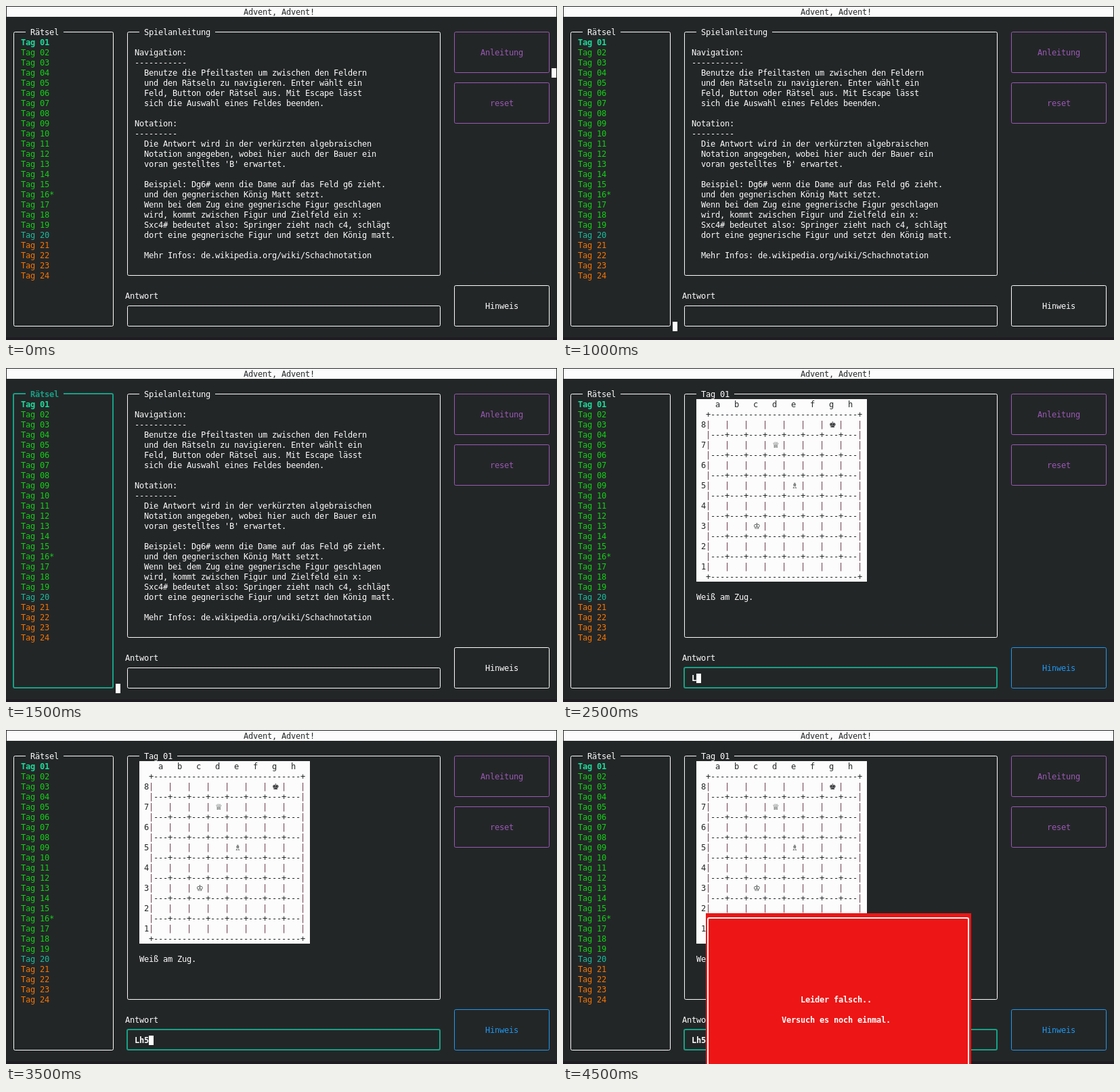
Recreate the animation shown at these times as an HTML page with a canvas. Size 814 by 494 pixels, loop 5000 ms.

```html
<!DOCTYPE html>
<html lang="de">
<head>
<meta charset="utf-8">
<title>Advent, Advent!</title>
<style>
  html, body { margin: 0; width: 100%; height: 100%; overflow: hidden; background: #232627; }
  canvas { display: block; }
</style>
</head>
<body>
<canvas id="screen" width="814" height="494"></canvas>
<script>
const ctx = document.getElementById('screen').getContext('2d', { alpha: false });
const CELL_W = 7, CELL_H = 15, STEP_MS = 500, STEPS = 10;
const INK = '#fcfcfc', BACK = '#232627', GREEN = '#11d116', MINT = '#1cdc9a', CYAN = '#1abc9c',
  FOCUS = '#16a085', ORANGE = '#f67400', PURPLE = '#9b59b6', BLUE = '#1d99f3', RED = '#ed1515',
  PIPE = '#6a3a4a', EDGE = '#1f1c22';
const MONO = '12px "DejaVu Sans Mono", monospace';
const SYMBOLS = '12px "DejaVu Sans", sans-serif';

const HELP = `Navigation:
-----------
  Benutze die Pfeiltasten um zwischen den Feldern
  und den Rätseln zu navigieren. Enter wählt ein
  Feld, Button oder Rätsel aus. Mit Escape lässt
  sich die Auswahl eines Feldes beenden.

Notation:
---------
  Die Antwort wird in der verkürzten algebraischen
  Notation angegeben, wobei hier auch der Bauer ein
  voran gestelltes 'B' erwartet.

  Beispiel: Dg6# wenn die Dame auf das Feld g6 zieht.
  und den gegnerischen König Matt setzt.
  Wenn bei dem Zug eine gegnerische Figur geschlagen
  wird, kommt zwischen Figur und Zielfeld ein x:
  Sxc4# bedeutet also: Springer zieht nach c4, schlägt
  dort eine gegnerische Figur und setzt den König matt.

  Mehr Infos: de.wikipedia.org/wiki/Schachnotation`.split('\n');

const PIECES = { g8: '\u265A', d7: '\u2655', e5: '\u2657', c3: '\u2654' };

const left = col => 1 + col * CELL_W;
const top_ = row => 1 + row * CELL_H;

function fillCells(col, row, cols, rows, color) {
  ctx.fillStyle = color;
  ctx.fillRect(left(col), top_(row), cols * CELL_W, rows * CELL_H);
}

// Terminal text: one glyph per cell.
function print(col, row, text, color = INK, bold = false) {
  ctx.font = (bold ? 'bold ' : '') + MONO;
  ctx.fillStyle = color;
  [...text].forEach((char, i) => {
    if (char !== ' ') ctx.fillText(char, left(col + i), top_(row) + 12);
  });
}

function box(col1, row1, col2, row2, { color = INK, title = '', bold = false } = {}) {
  const shift = bold ? 3 : 3.5;
  ctx.strokeStyle = color;
  ctx.lineWidth = bold ? 2 : 1;
  ctx.beginPath();
  ctx.roundRect(left(col1) + shift, top_(row1) + shift + 4,
    (col2 - col1) * CELL_W, (row2 - row1) * CELL_H, 2);
  ctx.stroke();
  if (title) {
    fillCells(col1 + 3, row1, title.length + 2, 1, BACK);
    print(col1 + 4, row1, title, color, bold);
  }
}

function button(col, row, label, labelCol, color) {
  box(94, row, 114, row + 4, { color });
  print(labelCol, row + 2, label, color);
}

function cursor(col, row) {
  ctx.fillStyle = INK;
  ctx.fillRect(left(col), top_(row) + 1, CELL_W, CELL_H - 1);
}

function drawDays() {
  for (let day = 1; day <= 24; day++) {
    const color = day === 1 ? MINT : day < 20 ? GREEN : day === 20 ? CYAN : ORANGE;
    const label = 'Tag ' + String(day).padStart(2, '0') + (day === 16 ? '*' : '');
    print(3, day + 2, label, color, day === 1);
  }
}

function drawBoard() {
  const printGrid = (row, text) => {
    print(30, row, text.replaceAll('|', ' '), BACK);
    print(30, row, text.replace(/[^|]/g, ' '), PIPE);
  };
  const border = '+' + '-'.repeat(31) + '+';
  fillCells(28, 3, 36, 18, INK);
  print(32, 3, [...'abcdefgh'].join('   '), BACK);
  printGrid(4, border);
  for (let rank = 8; rank >= 1; rank--) {
    const row = 21 - 2 * rank;
    print(29, row, String(rank), BACK);
    printGrid(row, '|   '.repeat(8) + '|');
    printGrid(row + 1, rank > 1 ? '|' + Array(8).fill('---').join('+') + '|' : border);
  }
  ctx.font = SYMBOLS;
  ctx.fillStyle = BACK;
  for (const [square, glyph] of Object.entries(PIECES)) {
    const col = 32 + 4 * 'abcdefgh'.indexOf(square[0]);
    ctx.fillText(glyph, left(col), top_(21 - 2 * square[1]) + 12);
  }
}

function drawPopup() {
  fillCells(30, 18, 56, 15, RED);
  box(30, 18, 85, 34, { bold: true });
  print(50, 26, 'Leider falsch..', INK, true);
  print(46, 28, 'Versuch es noch einmal.', INK, true);
}

function draw(step) {
  const solving = step >= 4;
  const answer = 'Lh5#'.slice(0, Math.max(0, step - 4));

  ctx.fillStyle = BACK;
  ctx.fillRect(0, 0, 814, 494);
  ctx.fillStyle = EDGE;
  ctx.fillRect(0, 490, 814, 4);
  fillCells(0, 0, 116, 1, INK);
  print(50, 0, 'Advent, Advent!', BACK);

  const listFocus = step === 3;
  box(1, 2, 22, 31, { title: 'Rätsel', color: listFocus ? FOCUS : INK, bold: listFocus });
  drawDays();

  box(25, 2, 91, 26, { title: solving ? 'Tag 01' : 'Spielanleitung' });
  if (solving) {
    drawBoard();
    print(28, 22, 'Weiß am Zug.');
  } else {
    HELP.forEach((line, i) => print(27, 4 + i, line));
  }

  print(25, 28, 'Antwort');
  box(25, 29, 91, 31, { color: solving ? FOCUS : INK, bold: solving });
  print(27, 30, answer, INK, true);

  button(94, 2, 'Anleitung', 100, PURPLE);
  button(94, 7, 'reset', 102, PURPLE);
  button(94, 27, 'Hinweis', 101, solving ? BLUE : INK);

  if (step === 9) drawPopup();
  else if (solving) cursor(27 + answer.length, 30);
  else cursor(...[[115, 6], [92, 26], [23, 31], [23, 31]][step]);
}

let shown = -1;
const start = performance.now();
function tick() {
  const step = Math.floor((performance.now() - start) / STEP_MS) % STEPS;
  if (step !== shown) draw(shown = step);
  requestAnimationFrame(tick);
}
tick();
</script>
</body>
</html>
```
